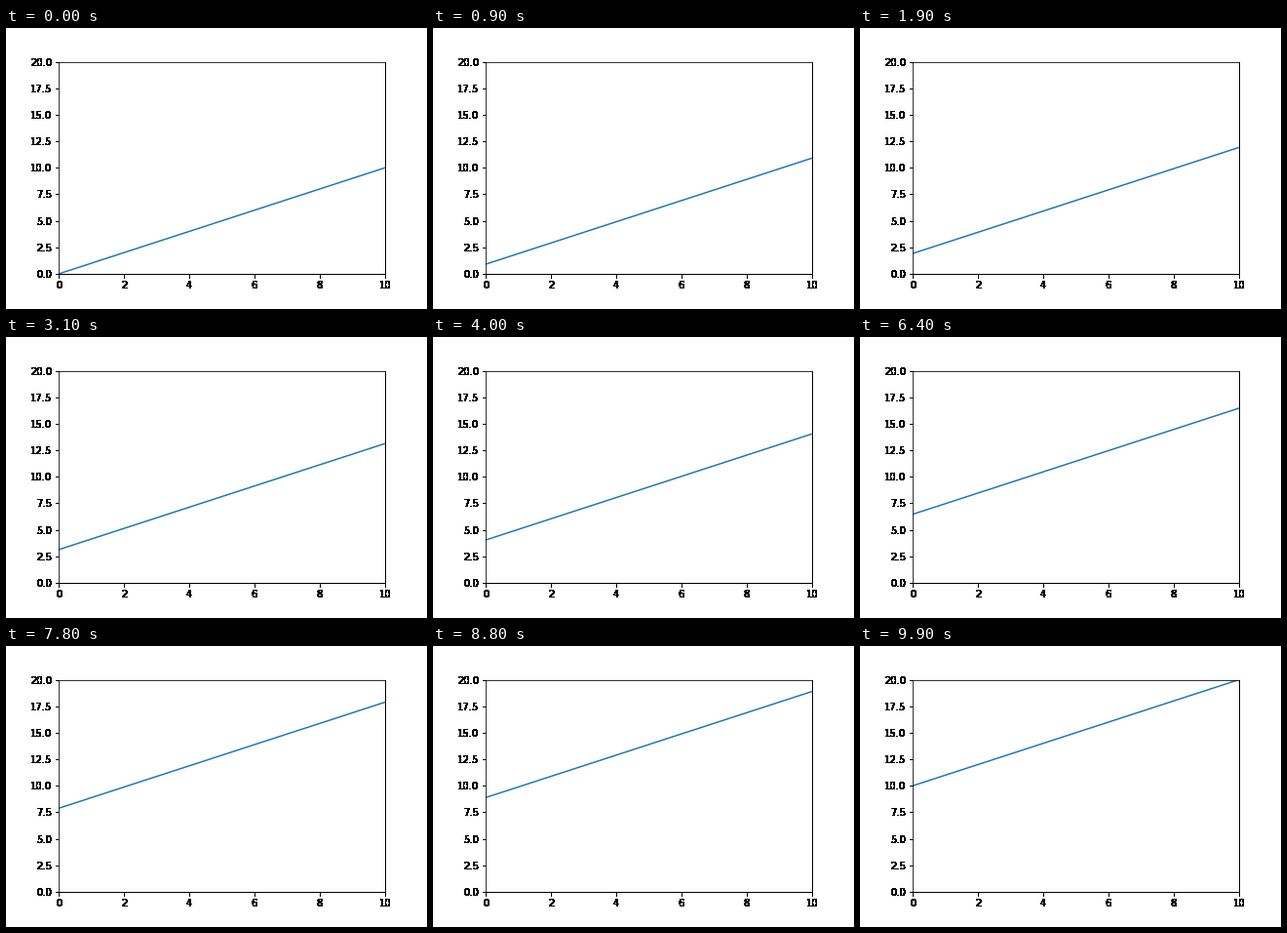
Write a matplotlib script that moves like this. It is 432x288 px and loops after 10000 ms.

```python
import numpy as np
import matplotlib.pyplot as plt
from matplotlib.animation import FuncAnimation

FRAMES = 100
INTERVAL = 100

plt.rcParams["font.family"] = "DejaVu Sans"
plt.rcParams["font.size"] = 10

fig, ax = plt.subplots(figsize=(6, 4), dpi=72, facecolor=(1, 1, 1, 0))
fig.subplots_adjust(left=0.125, right=0.9, bottom=0.125, top=0.88)
ax.set(xlim=(0, 10), ylim=(0, 20))

x = np.linspace(0, 10, 100)
shifts = np.linspace(0, 10, FRAMES)
line, = ax.plot(x, x, color="tab:blue", lw=1.5, visible=False)


def solid_ink():
    """Render the empty plot and turn every partly covered pixel opaque."""
    fig.canvas.draw()
    rgba = np.array(fig.canvas.buffer_rgba())
    rgb = rgba[..., :3].copy()
    rgb[rgba[..., 3] == 0] = 255
    return rgb


# Ticks and labels get hard, heavy edges from this layer behind the axes.
fig.figimage(solid_ink(), origin="upper", zorder=-1)
fig.patch.set_facecolor("white")
fig.patch.set_alpha(1)
line.set_visible(True)


def update(i):
    line.set_ydata(x + shifts[i])
    return line,


anim = FuncAnimation(fig, update, frames=FRAMES, interval=INTERVAL,
                     repeat=True, repeat_delay=0)
plt.show()
```
